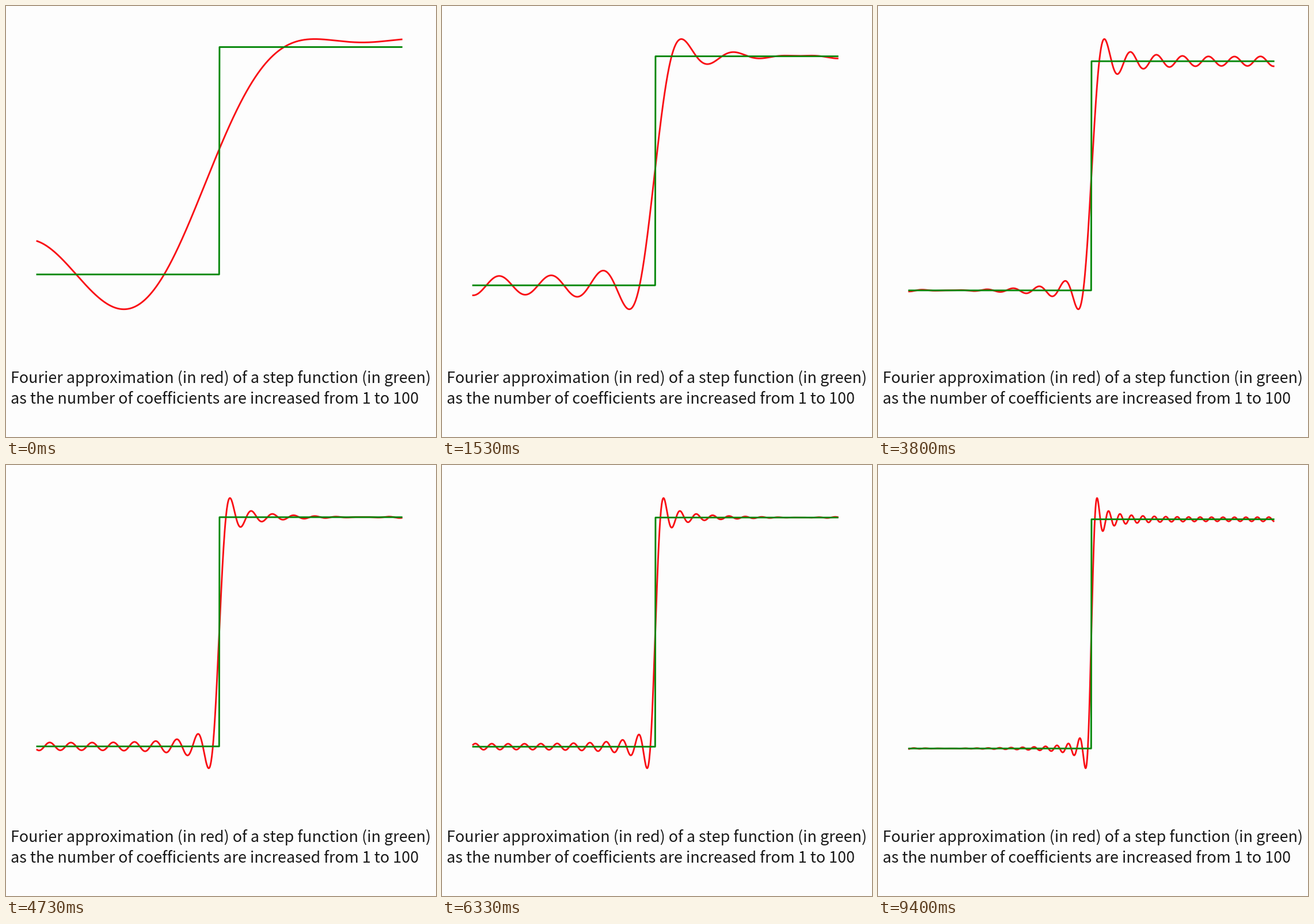
Animation, 747 px wide and 750 px high, one loop 9470 ms. Source, as a matplotlib script:

```python
import numpy as np
import matplotlib.pyplot as plt
from matplotlib.animation import FuncAnimation

W, H, DPI = 747, 750, 100
LOOP, FRAMES = 9470, 473       # loop in ms
TICK = LOOP / FRAMES
FIRST, HOLD = 130, 200         # first change, then time between changes
LEFT, RIGHT = 54.0, 687.2      # plot box in pixels
TOP, BOTTOM = 57.5, 527.7

PX = 72 / DPI                  # points per pixel
LINE = 2.9 * PX
BACK, RED, GREEN, INK = "#fdfdfd", "#f90f15", "#05870a", "#1a1a1a"

x = np.linspace(-1, 1, 1000)
step = np.where(x < 0, -0.5, 0.5)


def fourier(last):
    """Sum of the odd sine and cosine terms up to harmonic `last`."""
    n = np.arange(1, last + 1, 2)[:, None]
    sign = (-1.0) ** (n // 2)
    terms = (np.sin(n * x) + sign * np.cos(n * x)) / n
    return 2 / np.pi * terms.sum(axis=0) - 0.5


def last_harmonic(ms):
    changes = 0 if ms < FIRST else 1 + int((ms - FIRST) // HOLD)
    return 5 + 2 * changes


def curves(last):
    """Both curves in pixels, scaled so the sum fills the plot height."""
    wave = fourier(last)
    low, high = wave.min(), wave.max()
    scale = (BOTTOM - TOP) / (high - low)
    return [BOTTOM - (y - low) * scale for y in (wave, step)]


fig = plt.figure(figsize=(W / DPI, H / DPI), dpi=DPI, facecolor=BACK)
ax = fig.add_axes([0, 0, 1, 1])
ax.set_xlim(0, W)
ax.set_ylim(H, 0)
ax.axis("off")

px = LEFT + (x + 1) / 2 * (RIGHT - LEFT)
corners = [0, 499, 500, 999]   # the step needs only its ends and corners
style = dict(lw=LINE, snap=False, solid_capstyle="projecting")
red, = ax.plot(px, np.zeros_like(px), color=RED, **style)
green, = ax.plot(px[corners], np.zeros(4), color=GREEN, **style)

caption = [
    "Fourier approximation (in red) of a step function (in green)",
    "as the number of coefficients are increased from 1 to 100",
]
for row, line in enumerate(caption):
    ax.text(8, 655.8 + 36.7 * row, line, color=INK, fontsize=27 * PX,
            family="Noto Sans CJK JP", va="baseline")

poses = {last: curves(last) for last in range(5, last_harmonic(LOOP) + 1, 2)}


def update(i):
    # a change falling inside a tick shows from the start of that tick
    wave, flat = poses[last_harmonic((i + 1) * TICK - 0.01)]
    red.set_ydata(wave)
    green.set_ydata(flat[corners])
    return red, green


anim = FuncAnimation(fig, update, frames=FRAMES, interval=TICK,
                     repeat=True, repeat_delay=0, blit=False)
plt.show()
```
